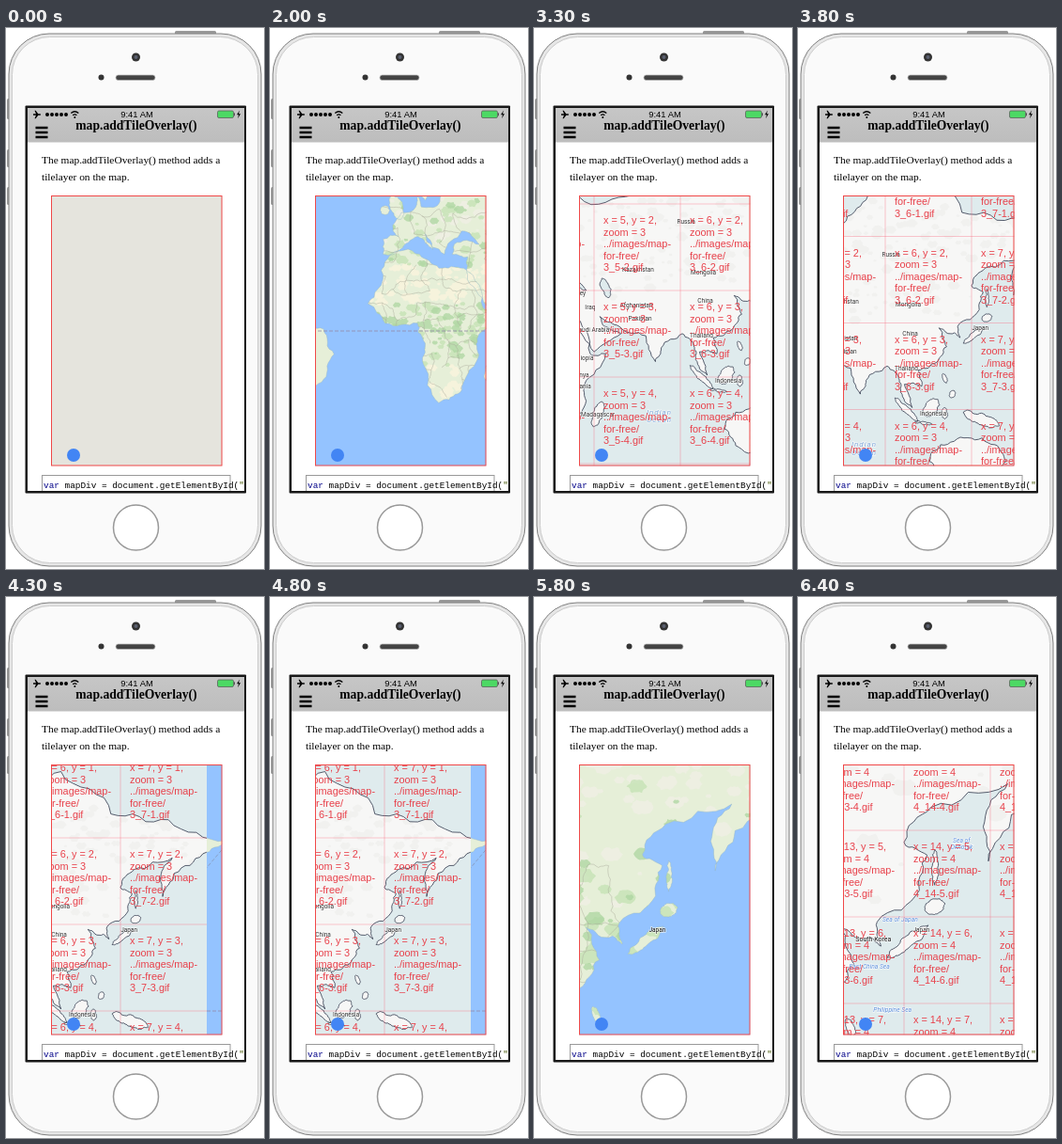
Animation of 275 by 575 pixels, one loop 8800 ms. Source, as an HTML page with a canvas:

```html
<!DOCTYPE html>
<html lang="en">
<head>
<meta charset="utf-8">
<title>map.addTileOverlay()</title>
<style>
html, body { margin: 0; width: 100%; height: 100%; overflow: hidden; background: #fff; }
svg, canvas { position: absolute; left: 0; top: 0; width: 275px; height: 575px; }
.serif { font-family: "Liberation Serif", serif; }
.mono { font: 9.4px "Liberation Mono", monospace; }
</style>
</head>
<body>
<svg viewBox="0 0 275 575">
  <defs>
    <linearGradient id="bar" x2="0" y2="1"><stop offset="0" stop-color="#c6c6c6"/><stop offset="1" stop-color="#bdbdbd"/></linearGradient>
    <clipPath id="screen"><rect x="23" y="85" width="231" height="407"/></clipPath>
  </defs>
  <g fill="#999">
    <rect x="1" y="75" width="5" height="22" rx="1.5"/><rect x="1" y="129" width="5" height="19" rx="1.5"/>
    <rect x="1" y="169" width="5" height="19" rx="1.5"/><rect x="180" y="3" width="44" height="4" rx="1.5"/>
  </g>
  <rect x="3" y="6" width="269" height="566" rx="43" fill="#e6e6e6" stroke="#808080"/>
  <rect x="6.5" y="9.500" width="262" height="559" rx="40" fill="#fafafa" stroke="#ccc"/>
  <circle cx="138.500" cy="31" r="4.500" fill="#333"/><circle cx="138.500" cy="31" r="2" fill="#5b6070"/>
  <circle cx="101.500" cy="52.500" r="3" fill="#333"/>
  <rect x="117" y="50" width="42" height="5.500" rx="2.700" fill="#444" stroke="#bbb" stroke-width=".7"/>
  <circle cx="138.500" cy="531" r="24" fill="#fff" stroke="#999" stroke-width="1.500"/>
  <rect x="20.500" y="82.500" width="235.500" height="412" rx="1" fill="#181818"/>
  <g clip-path="url(#screen)">
    <rect x="23" y="85" width="231" height="408" fill="#fff"/>
    <rect x="23" y="85" width="231" height="36.500" fill="url(#bar)"/>
    <path d="M29 91.300h3l-1.500-3.500h1.200l2.600 3.500h2.200q1.300.7 0 1.400h-2.200l-2.600 3.500h-1.200l1.500-3.500h-3z"/>
    <path d="M44 92h20.500" stroke="#000" stroke-width="4" stroke-linecap="round" stroke-dasharray="0 5"/>
    <path d="M69.300 90.500q4-3.600 8 0M71.200 92.800q2.100-1.900 4.200 0" fill="none" stroke="#000" stroke-width="1.300"/>
    <circle cx="73.300" cy="95" r="1"/>
    <text x="139.500" y="95.300" text-anchor="middle" font-size="9.400" font-family="Liberation Sans, sans-serif">9:41 AM</text>
    <rect x="225.500" y="88" width="17" height="7.500" rx="1.500" fill="#4cd964" stroke="#555" stroke-width=".7"/>
    <path d="M243.500 90.300v3" stroke="#555"/><path d="M249 87.500l-3 4.700h2l-1 4 3-5h-2z"/>
    <path d="M31.500 106h13M31.500 111h13M31.500 116h13" stroke="#000" stroke-width="2.700"/>
    <text class="serif" x="74.300" y="107.500" font-size="13.600" font-weight="bold">map.addTileOverlay()</text>
    <g class="serif" font-size="11.400">
      <text x="38" y="143.500">The map.addTileOverlay() method adds a</text>
      <text x="38" y="161.500">tilelayer on the map.</text>
    </g>
    <rect x="38.500" y="475.500" width="200.500" height="30" fill="none" stroke="#999"/>
    <text class="mono" x="40" y="488.500"><tspan fill="#008">var</tspan> mapDiv = document.getElementById(<tspan fill="#450">"</tspan></text>
  </g>
</svg>
<canvas id="map"></canvas>
<script>
const LOOP = 8800, STEP = 100, WORLD = 736, TILE = 92;
const BOX = { x: 48, y: 178, w: 182.5, h: 287.5 };
const SEA = "#94c3ff", PALE_SEA = "#dfebed";
const canvas = document.getElementById("map"), ctx = canvas.getContext("2d");
const dpr = window.devicePixelRatio || 1;
canvas.width = 275 * dpr;
canvas.height = 575 * dpr;

let seed = 11;
const random = () => (seed = seed * 16807 % 2147483647) / 2147483647;
const between = (a, b) => a + (b - a) * random();
const ramp = (t, from, to) => Math.min(1, Math.max(0, (t - from) / (to - from)));

const project = (lon, lat) => [
  lon * WORLD / 360,
  -Math.log(Math.tan(Math.PI / 4 + lat * Math.PI / 360)) * WORLD / (2 * Math.PI)
];

// Midpoint displacement turns a few key points into a ragged line.
function roughen(points, closed, depth = 3) {
  if (!depth) return points;
  const finer = points.flatMap((p, i) => {
    const q = points[i + 1] || (closed && points[0]);
    if (!q) return [p];
    const bend = between(-.17, .17);
    return [p, [(p[0] + q[0]) / 2 + (p[1] - q[1]) * bend, (p[1] + q[1]) / 2 + (q[0] - p[0]) * bend]];
  });
  return roughen(finer, closed, depth - 1);
}

function trace(path, points, closed) {
  points.forEach(([x, y], i) => i ? path.lineTo(x, y) : path.moveTo(x, y));
  if (closed) path.closePath();
}

function addShore(path, text) {
  const points = text.split(" ").map(pair => project(...pair.split(",").map(Number)));
  trace(path, roughen(points, true), true);
}

function addIsland(path, lon, lat, length, width, tilt) {
  const [cx, cy] = project(lon, lat), unit = WORLD / 360 / Math.cos(lat * Math.PI / 180);
  const a = -tilt * Math.PI / 180, points = [];
  for (let i = 0; i < 8; i++) {
    const u = Math.cos(i * Math.PI / 4) * length / 2 * unit, v = Math.sin(i * Math.PI / 4) * width / 2 * unit;
    points.push([cx + u * Math.cos(a) - v * Math.sin(a), cy + u * Math.sin(a) + v * Math.cos(a)]);
  }
  trace(path, roughen(points, true), true);
}

const land = new Path2D(), lake = new Path2D(), borders = new Path2D(), dateLine = new Path2D();
const africa = "-6,36 10,37 20,31 33,31 43,12 51,12 40,-4 40,-15 35,-22 30,-31 20,-35 12,-17 12,-5 9,4 -8,4 -17,14 -10,30";
const northCoast = "-9,37 -9,43 -1,44 -4,48 8,54 9,57 11,54 20,55 25,60 22,65 13,56 5,60 20,70 40,67 68,69 80,73 104,77 130,71 160,70 190,66";
const eastCoast = "178,63 163,58 157,51 156,57 162,62 142,59 135,54 141,52 139,46 128,40 129,35 126,37 118,39 122,31 117,24 107,20 109,12 100,13 104,1";
const southCoast = "98,9 97,16 91,22 80,15 77,8 72,21 57,26 48,30 52,25 59,22 45,13 35,28 35,36 27,37 28,41 41,41 32,46 23,37 13,45 17,39 9,44 0,39";
addShore(land, africa);
addShore(land, `${northCoast} ${eastCoast} ${southCoast}`);

addIsland(land, -2, 54, 8, 4, 110);     // Britain
addIsland(land, -8, 53, 3, 3, 0);       // Ireland
addIsland(land, 47, -19, 13, 5, 70);    // Madagascar
addIsland(land, 136, 36, 11, 2.2, 38);  // Honshu
addIsland(land, 143, 43, 4, 3, 20);     // Hokkaido
addIsland(land, 143, 50, 6, 1, 90);     // Sakhalin
addIsland(land, 121, 16, 5, 2, 110);    // Luzon
addIsland(land, 125, 8, 4, 3, 60);      // Mindanao
addIsland(land, 114, 1, 11, 7, 50);     // Borneo
addIsland(land, 101, 0, 17, 3, -45);    // Sumatra
addIsland(land, 110, -7, 9, 1.5, -8);   // Java
addIsland(land, 121, -2, 6, 3, 90);     // Sulawesi
addIsland(land, 140, -5, 20, 6, -20);   // New Guinea
addIsland(land, 133, -26, 36, 22, 0);   // Australia
addIsland(land, -53, -12, 36, 36, 0);   // Brazil
addIsland(lake, 51, 42, 8, 3, 110);     // Caspian Sea
trace(dateLine, [project(180, 48), project(170, 53), project(190, 65)]);

// Borders follow a jittered grid; the land clips it.
const COLS = 19, ROWS = 14;
const nodes = Array.from({ length: COLS * ROWS }, (_, i) =>
  project(i % COLS * 8 - 18 + between(-3, 3), Math.floor(i / COLS) * 6.5 - 32 + between(-2, 2)));
nodes.forEach((node, i) => {
  const ends = [i % COLS < COLS - 1 && nodes[i + 1], nodes[i + COLS]];
  for (const end of ends) if (end && random() < .6) trace(borders, roughen([node, end], false));
});

// Ground cover is scattered in patches chosen by climate.
const cover = { "#fbf4de": new Path2D(), "#f1efe6": new Path2D(), "#c3e2b3": new Path2D(), "#add6a0": new Path2D() };
const [sand, tundra, grass, wood] = Object.values(cover);
for (let i = 0; i < 1500; i++) {
  const lon = between(-20, 190), lat = between(-36, 74), r = between(1.5, 7);
  const desert = lon < 110 && Math.abs(lat - 23 - Math.max(0, lon - 45) * .3) < 9 || lat < -18;
  const patch = desert ? sand : random() < (lat - 35) / 32 ? tundra : random() < .6 ? grass : wood;
  const [x, y] = project(lon, lat);
  const blob = Array.from({ length: 6 }, (_, j) => [x + r * Math.cos(j * Math.PI / 3), y + r * .7 * Math.sin(j * Math.PI / 3)]);
  trace(patch, roughen(blob, true, 2), true);
}

// text|longitude|latitude
const parseLabels = text => text.split(/\s+/).map(item => {
  const [name, lon, lat] = item.split("|");
  return { name: name.replace(/_/g, " "), point: project(+lon, +lat) };
});
const countries = parseLabels(`United|-3|57 Kingdom|-3|55 Germany|10|50 Ukraine|32|51 Spain|-4|42 Italy|13|42 Turkey|36|39
Iraq|43|33 Algeria|2|28 Libya|18|26 Egypt|30|28 Mali|-1|18 Niger|10|17 Chad|19|14 Sudan|30|17 Nigeria|8|9 Ethiopia|39|9
Kenya|38|0 Tanzania|37|-6 Angola|16|-12 Namibia|16|-19 South_Africa|20|-33 Kazakhstan|68|48 Russia|93|62 Mongolia|102|47
China|103|36 Afghanistan|67|34 Pakistan|69|28 Saudi_Arabia|44|23 Thailand|101|20 Madagascar|47|-20 Indonesia|115|-3 Japan|139.5|38`);
const oceans = parseLabels("North|-38|38 Atlantic|-38|34 Ocean|-38|30 South|-15|-23 Atlantic|-15|-27 Ocean|-15|-32 Indian|79|-19 Ocean|79|-23");
const seas = parseLabels("Sea_of|150|54 Okhotsk|150|53 Sea_of_Japan|134|40 East_China_Sea|126|30 Philippine_Sea|132|20");
const korea = parseLabels("South_Korea|127|36");
const japan = countries.filter(label => label.name === "Japan");

// Two drags, then a zoom about a fixed point; x and y locate longitude and latitude zero.
function viewAt(t) {
  const first = ramp(t, 2500, 3300), second = ramp(t, 3300, 4300), k = 1 + ramp(t, 5000, 6100);
  const x = 139 - 167 * first - 126 * second, y = 322 + 49 * first + 69 * second;
  const focus = { x: 131, y: 356 };
  return { k, x: focus.x + (x - focus.x) * k, y: focus.y + (y - focus.y) * k };
}

const overlayAt = t => t < 5000 ? ramp(t, 2000, 2400) * (1 - ramp(t, 4800, 5000)) : ramp(t, 5900, 6300);

function inWorld({ k, x, y }, draw) {
  ctx.save();
  ctx.translate(x, y);
  ctx.scale(k, k);
  draw();
  ctx.restore();
}

function onLand(draw) {
  ctx.save();
  ctx.clip(land);
  draw();
  ctx.restore();
}

function fillPath(path, color) {
  ctx.fillStyle = color;
  ctx.fill(path);
}

function strokePath(path, color, width) {
  ctx.strokeStyle = color;
  ctx.lineWidth = width;
  ctx.stroke(path);
}

function fillBox(color) {
  ctx.fillStyle = color;
  ctx.fillRect(BOX.x, BOX.y, BOX.w, BOX.h);
}

function drawLabels(list, { k, x, y }, font, color) {
  ctx.font = font;
  ctx.textAlign = "center";
  ctx.lineWidth = 1.4;
  ctx.strokeStyle = "rgba(255,255,255,.7)";
  ctx.fillStyle = color;
  for (const { name, point: [px, py] } of list) {
    ctx.strokeText(name, x + px * k, y + py * k);
    ctx.fillText(name, x + px * k, y + py * k);
  }
}

const smallFont = "6.5px Roboto, sans-serif";

function drawBase(view) {
  const { k } = view;
  fillBox(SEA);
  inWorld(view, () => {
    fillPath(land, "#e6efd8");
    onLand(() => {
      ctx.globalAlpha = .75;
      for (const color in cover) fillPath(cover[color], color);
      strokePath(borders, "#a9a798", .6 / k);
    });
    fillPath(lake, SEA);
    strokePath(land, "#8db0bd", .4 / k);
    const equator = new Path2D();
    trace(equator, [[-WORLD, 0], [WORLD, 0]]);
    ctx.setLineDash([4 / k, 2 / k]);
    strokePath(equator, "#9388a6", .8 / k);
    strokePath(dateLine, "#8797b8", .8 / k);
  });
  if (k > 1.1) drawLabels(japan, view, smallFont, "#111");
}

function drawTiles({ k, x: x0, y: y0 }) {
  const zoom = k < 1.5 ? 3 : 4, count = 2 ** zoom, size = WORLD * k / count, unit = size / TILE;
  ctx.font = `${10.9 * unit}px "Liberation Sans", sans-serif`;
  ctx.textAlign = "left";
  ctx.lineWidth = .6;
  ctx.strokeStyle = "rgba(245,100,120,.6)";
  ctx.fillStyle = "#e8414b";
  for (let x = 0; x < count; x++) for (let y = 0; y < count; y++) {
    const left = x0 + (x - count / 2) * size, top = y0 + (y - count / 2) * size;
    const right = BOX.x + BOX.w, bottom = BOX.y + BOX.h;
    if (left > right || left + size < BOX.x || top > bottom || top + size < BOX.y) continue;
    ctx.beginPath();
    ctx.moveTo(left, top + size);
    ctx.lineTo(left, top);
    ctx.lineTo(left + size, top);
    ctx.stroke();
    [`x = ${x}, y = ${y},`, `zoom = ${zoom}`, "../images/map-", "for-free/", `${zoom}_${x}-${y}.gif`]
      .forEach((line, i) => ctx.fillText(line, left + 10 * unit, top + (21 + 12.6 * i) * unit));
  }
}

function drawOverlay(view) {
  const { k, x } = view;
  ctx.save();
  ctx.beginPath();
  ctx.rect(BOX.x, BOX.y, x + WORLD / 2 * k - BOX.x, BOX.h);
  ctx.clip();
  fillBox(PALE_SEA);
  inWorld(view, () => {
    fillPath(land, "#f7f7f6");
    onLand(() => fillPath(tundra, "rgba(225,225,222,.3)"));
    fillPath(lake, PALE_SEA);
    strokePath(land, "#30384c", .8 / k);
    strokePath(lake, "#30384c", .8 / k);
  });
  drawLabels(countries, view, smallFont, "#333");
  if (k > 1.5) {
    drawLabels(korea, view, "7px Roboto, sans-serif", "#111");
    drawLabels(seas, view, "italic 6.7px Roboto, sans-serif", "#5d8fdc");
  } else {
    ctx.letterSpacing = "1px";
    drawLabels(oceans, view, "italic 8px Roboto, sans-serif", "#7fa6d8");
    ctx.letterSpacing = "0px";
  }
  drawTiles(view);
  ctx.restore();
}

function drawMap(t) {
  if (t < 2000) return fillBox("#e5e4dd");
  const view = viewAt(t), fade = overlayAt(t);
  drawBase(view);
  ctx.globalAlpha = fade;
  if (fade) drawOverlay(view);
}

function render(t) {
  ctx.setTransform(dpr, 0, 0, dpr, 0, 0);
  ctx.clearRect(0, 0, 275, 575);
  ctx.save();
  ctx.beginPath();
  ctx.rect(BOX.x, BOX.y, BOX.w, BOX.h);
  ctx.clip();
  drawMap(t);
  ctx.restore();
  ctx.fillStyle = "#4285f4";
  ctx.beginPath();
  ctx.arc(72, 454, 7, 0, 2 * Math.PI);
  ctx.fill();
  ctx.strokeStyle = "#f04848";
  ctx.lineWidth = 1;
  ctx.strokeRect(48.5, 178.5, 181.5, 286.5);
}

const start = performance.now();
function tick() {
  const t = (performance.now() - start) % LOOP;
  render(Math.floor(t / STEP) * STEP);
  requestAnimationFrame(tick);
}
tick();
</script>
</body>
</html>
```
